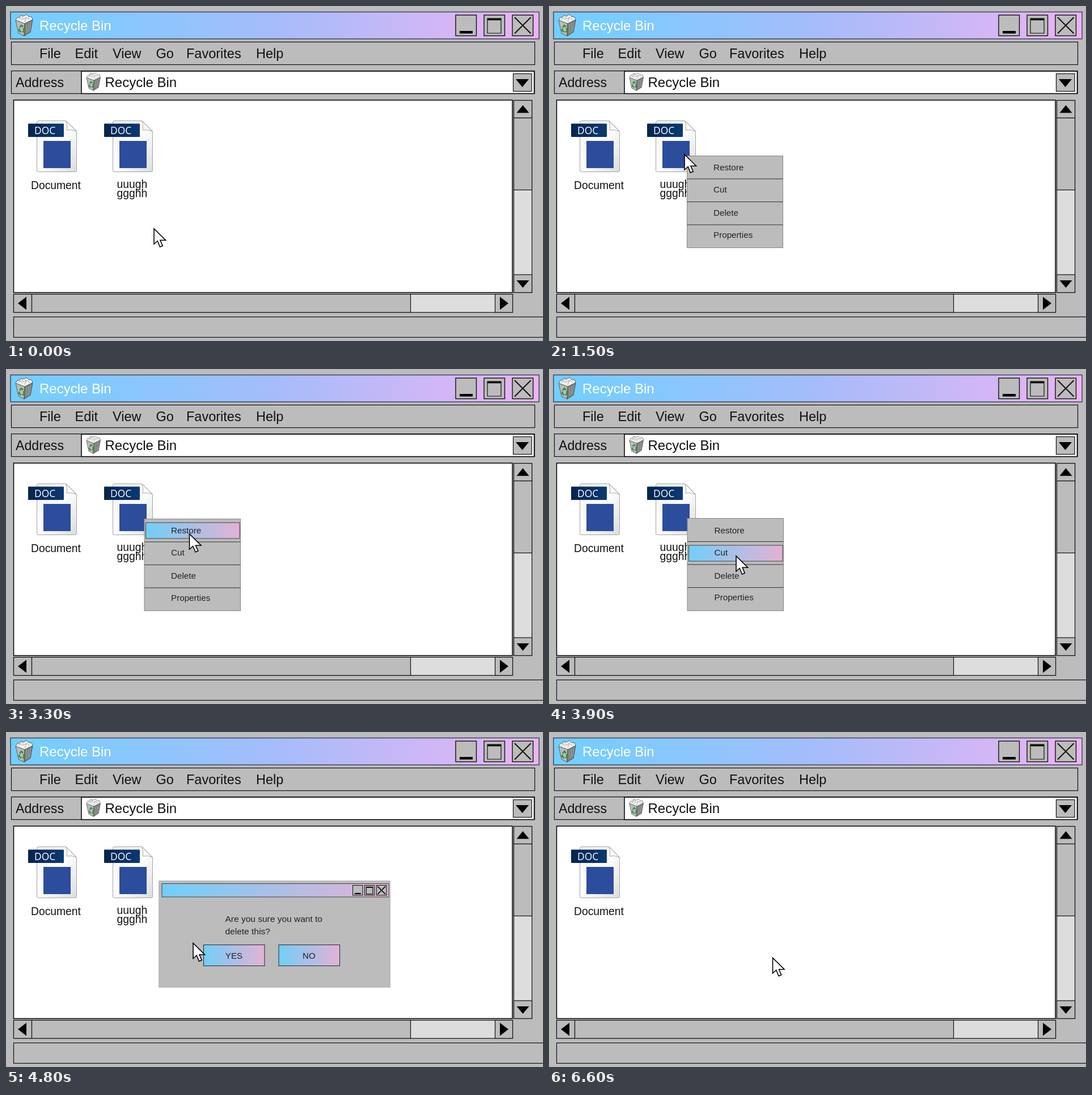
Animation of 947x591 px, one loop 6900 ms. Source, as an HTML page:

```html
<!DOCTYPE html>
<html lang="en">
<head>
<meta charset="utf-8">
<title>Recycle Bin</title>
<style>
  html, body { margin: 0; width: 100%; height: 100%; overflow: hidden; background: #bcbcbc; }
  svg { display: block; width: 100vw; height: 100vh; }
  text { font-family: "Liberation Sans", Arial, sans-serif; fill: #111; white-space: pre; }
  .big { font-size: 24px; }
  .label { font-size: 19.3px; }
  .small { font-size: 15.2px; fill: #222; }
  .badge { font: 500 17.4px "Open Sans", "Noto Sans", sans-serif; fill: #fff; }
  .mid { text-anchor: middle; }
</style>
</head>
<body>
<svg id="stage" viewBox="0 0 947 591" preserveAspectRatio="none">
  <defs>
    <linearGradient id="bar">
      <stop offset="0" stop-color="#6fd0ff"/>
      <stop offset=".5" stop-color="#a6bcfa"/>
      <stop offset="1" stop-color="#ecb3f3"/>
    </linearGradient>
    <linearGradient id="soft">
      <stop offset="0" stop-color="#70cff8"/>
      <stop offset=".5" stop-color="#acbfe6"/>
      <stop offset="1" stop-color="#e4b2d5"/>
    </linearGradient>
    <linearGradient id="paper" x1="0" y1="0" x2="1" y2="1">
      <stop offset="0" stop-color="#f1f1f1"/>
      <stop offset=".5" stop-color="#fdfdfd"/>
      <stop offset="1" stop-color="#dcdde0"/>
    </linearGradient>
    <linearGradient id="navy">
      <stop offset="0" stop-color="#06244f"/>
      <stop offset="1" stop-color="#0b3a73"/>
    </linearGradient>

    <g id="bin" stroke-linejoin="round">
      <path d="M1 10 17 16 16 38 6 33Z" fill="#b9bcba" stroke="#555" stroke-width=".9"/>
      <path d="M17 16 31 9 27 31 16 38Z" fill="#7d807e" stroke="#444" stroke-width=".9"/>
      <path d="M20 17 21 33M24 15 24 31M28 13 26 29" stroke="#a5a8a6" fill="none"/>
      <path d="M1 10 4 5 8 5 10 1 15 3 20 0 24 4 29 4 31 9 17 16Z" fill="#f4f4f2" stroke="#555" stroke-width=".9"/>
      <path d="M5 9 10 6 13 10M10 1 15 8 20 5 17 13M20 5 26 9" fill="none" stroke="#999" stroke-width=".9"/>
      <path d="M8 23 11 19 14 22M15 24 16 29 13 31M11 31 7 28 8 25" fill="none" stroke="#2f8f35" stroke-width="2.5"/>
    </g>

    <g id="doc">
      <path d="M57.5 202.5H106L124.5 221V290Q124.5 292.5 122 292.5H57Q54.5 292.5 54.5 290V205Q54.5 202.5 57.5 202.5Z" fill="url(#paper)" stroke="#a3a5a8"/>
      <path d="M106 203Q109 212 107 219 116 217 124 221Z" fill="#fff" stroke="#a3a5a8" stroke-linejoin="round"/>
      <rect x="66" y="238" width="48" height="48" fill="#2c4c9c"/>
      <rect x="39" y="207.500" width="63" height="23.500" rx="1" fill="url(#navy)"/>
      <text class="badge" x="50" y="225.500">DOC</text>
    </g>
  </defs>
</svg>
<script>
const NS = 'http://www.w3.org/2000/svg';
const GREY = '#bcbcbc', TRACK = '#dddddd', INK = '#111';
const stage = document.getElementById('stage');

function add(parent, tag, attrs, content) {
  const el = document.createElementNS(NS, tag);
  for (const k in attrs) el.setAttribute(k, attrs[k]);
  if (content) el.textContent = content;
  return parent.appendChild(el);
}
const group = () => add(stage, 'g', {});

// box given by its left, top, right and bottom edges
function box(p, l, t, r, b, fill = GREY, stroke = INK, line = 1.2) {
  return add(p, 'rect', { x: l, y: t, width: r - l, height: b - t, fill, stroke, 'stroke-width': line });
}
const shape = (p, d, fill = '#000') => add(p, 'path', { d, fill });
const stroke = (p, d, width, color = INK) =>
  add(p, 'path', { d, fill: 'none', stroke: color, 'stroke-width': width });
const text = (p, cls, x, y, str) => add(p, 'text', { class: cls, x, y }, str);

// minimise, maximise and close; s scales the marks
function windowButtons(p, xs, top, size, s) {
  xs.forEach(x => box(p, x, top, x + size, top + size, GREY, INK, s > .7 ? 1.4 : 1));
  const [a, b, c] = xs, at = n => n * s;
  shape(p, `M${a + at(7)} ${top + at(28)}h${at(23)}v${at(4.5)}h${at(-23)}z`);
  const l = b + at(6), r = b + at(30), t = top + at(6), m = top + at(32);
  stroke(p, `M${l} ${t}H${r}V${m}H${l}Z`, 1.2);
  stroke(p, `M${l} ${t + at(1.5)}H${r}`, at(3.5));
  const k = at(4), e = size - k;
  stroke(p, `M${c + k} ${top + k}L${c + e} ${top + e}M${c + e} ${top + k}L${c + k} ${top + e}`, s > .7 ? 2 : 1.8);
}

function drawWindow(p) {
  box(p, 8, 10.5, 940, 58, 'url(#bar)', '#3f4568', 1.5);
  add(p, 'use', { href: '#bin', transform: 'translate(16 15)' });
  text(p, 'big', 59, 43, 'Recycle Bin').style.fill = '#fff';
  windowButtons(p, [793, 843, 893], 16, 36.5, 1);

  box(p, 9.5, 63.5, 932.5, 103.5);
  [['File', 59], ['Edit', 121.5], ['View', 188], ['Go', 264.5], ['Favorites', 318], ['Help', 441]]
    .forEach(([s, x]) => { text(p, 'big', x, 91.5, s).style.fontSize = '23.5px'; });

  box(p, 9.5, 114.5, 932, 154.5);
  text(p, 'big', 17, 143, 'Address').style.fontSize = '23.2px';
  box(p, 133, 115, 931.5, 154.5, '#fff', '#000', 1.5);
  add(p, 'use', { href: '#bin', transform: 'translate(141 118) scale(.82)' });
  text(p, 'big', 174.500, 143, 'Recycle Bin');
  box(p, 894.5, 119.5, 927, 150.5);
  shape(p, 'M899 129H922L910.500 143Z');

  box(p, 13.5, 166, 893, 505.5, '#fff', '#000', 1.5);

  box(p, 895.5, 166.5, 927.5, 505.5, TRACK);
  box(p, 895.5, 166.5, 927.5, 197.5);
  box(p, 895.5, 197.5, 927.5, 324.5);
  box(p, 895.5, 474, 927.5, 505.5);
  shape(p, 'M900.500 188.500H922.500L911.500 175ZM900.500 484H922.500L911.500 497Z');

  box(p, 13.5, 508.5, 893.5, 540.5, TRACK);
  box(p, 13.5, 508.5, 45.5, 540.5);
  box(p, 45.5, 508.5, 713.5, 540.5);
  box(p, 862.5, 508.5, 893.5, 540.5);
  shape(p, 'M21 524.500 36 513V536ZM871 513V536L886 524.500Z');

  box(p, 13.5, 548.5, 960, 584.5);
}

function drawMenu(l, t, r, textX, active) {
  const p = group();
  const shift = t - 264.5;
  box(p, l, t, r, 426.5, GREY, '#888', 1);
  if (active >= 0) {
    const top = [271, 311, 351][active];
    box(p, l + 2.5, top, r - 1.5, top + 28, 'url(#soft)', '#444', 1);
  }
  [305, 345.5, 386].forEach(y => stroke(p, `M${l} ${y + shift / 2}H${r}`, 1.2, '#333'));
  [['Restore', 290], ['Cut', 329], ['Delete', 370], ['Properties', 408.5]]
    .forEach(([s, y]) => text(p, 'small', textX, y + shift / 2, s));
  return p;
}

function drawDialog() {
  const p = group();
  box(p, 269, 262, 678, 451, GREY, 'none');
  box(p, 275, 267.5, 675, 291, 'url(#soft)', '#444', 1);
  windowButtons(p, [611.5, 632.5, 653.5], 270.5, 17.5, .48);
  ['Are you sure you want to', 'delete this?'].forEach((s, i) => {
    text(p, 'small', 386.5, 335 + i * 21.5, s).style.fontSize = '15.5px';
  });
  [['YES', 348.5], ['NO', 481]].forEach(([s, x]) => {
    box(p, x, 375.5, x + 107.5, 412.5, 'url(#soft)', '#333', 1.1);
    text(p, 'small mid', x + 53.5, 400, s);
  });
  return p;
}

drawWindow(group());
const first = group();
add(first, 'use', { href: '#doc' });
text(first, 'label', 44, 323, 'Document');

const second = group();
add(second, 'use', { href: '#doc', x: 134 });
text(second, 'label', 195.5, 321, 'uuugh');
text(second, 'label', 195.5, 337, 'ggghh');

const views = {
  menu: drawMenu(243.5, 264.5, 412.5, 290, -1),
  restore: drawMenu(244, 264.5, 413.5, 291, 0),
  cut: drawMenu(244, 263.5, 413.5, 291.5, 1),
  remove: drawMenu(244.5, 263.5, 415.5, 292.5, 2),
  ask: drawDialog()
};

const pointer = add(stage, 'path', {
  d: 'M0 0V27L6.200 21.500 10.500 32 15.200 30 11 20.200H20.500Z',
  fill: '#fff', stroke: '#000', 'stroke-width': 1.6
});

// one row per 300 ms: pointer tip, view on top
const STEP = 300;
const steps = [
  [261, 393, ''], [252, 365, ''], [250, 338, ''], [250, 316, ''], [241, 291, ''],
  [239, 262, 'menu'], [281, 262, 'menu'], [303, 262, 'menu'], [322, 262, 'menu'],
  [322, 272, 'restore'], [325, 282, 'restore'], [323.5, 291, 'restore'],
  [330, 316, 'cut'], [330, 330, 'cut'],
  [330, 359, 'remove'], [330, 372.5, 'remove'],
  [330, 372.5, 'ask'], [344, 382, 'ask'], [353.5, 388, 'ask'], [378, 393, 'ask'],
  [394.5, 398.5, 'ask'], [394.5, 398.5, 'ask'],
  [394.5, 398.5, 'gone']
];

const start = performance.now();
function draw() {
  const i = Math.floor((performance.now() - start) / STEP) % steps.length;
  const [x, y, view] = steps[i];
  pointer.setAttribute('transform', `translate(${x} ${y})`);
  for (const k in views) views[k].style.display = k === view ? '' : 'none';
  second.style.display = view === 'gone' ? 'none' : '';
  requestAnimationFrame(draw);
}
draw();
</script>
</body>
</html>
```
